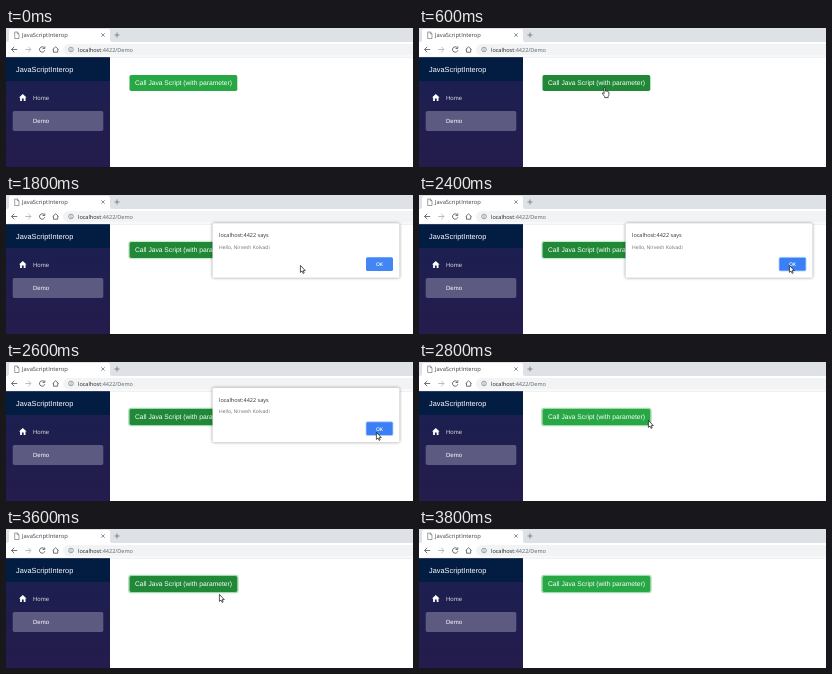
These frames come from a looping animation (407 by 139 pixels, 5800 ms). An HTML page:

```html
<!DOCTYPE html>
<html lang="en">
<head>
<meta charset="utf-8">
<title>JavaScriptInterop</title>
<style>
  html, body { margin: 0; width: 100%; height: 100%; overflow: hidden; background: #fff; }
  svg { display: block; width: 100%; height: 100%; }
  text { font-family: "Liberation Sans", Arial, sans-serif; text-rendering: geometricPrecision; }
  .ui { font-family: "Open Sans", sans-serif; }
  .line { fill: none; stroke: #5f6368; stroke-width: .9; }
  #box { filter: drop-shadow(0 .8px 1.8px rgba(0, 0, 0, .45)); }
  #cursor path { fill: #fff; stroke: #111; stroke-width: .7; stroke-linejoin: round; }
</style>
</head>
<body>
<svg viewBox="0 0 407 139">
  <defs>
    <linearGradient id="side" x2="0" y2="1">
      <stop stop-color="#1a2052"/>
      <stop offset="1" stop-color="#241c4c"/>
    </linearGradient>
  </defs>

  <!-- browser frame -->
  <rect width="407" height="14" fill="#dee1e6"/>
  <path d="M1 14Q3 14 3 12V3Q3 1 5 1H102Q104 1 104 3V12Q104 14 106 14Z" fill="#fff"/>
  <path d="M8.7 4H11.3L13 5.7V10.5H8.7ZM11.3 4V5.7H13" class="line" style="stroke-width:.6"/>
  <text class="ui" x="16" y="9" font-size="5.78" fill="#3c4043">JavaScriptInterop</text>
  <path d="M95.3 5.3L98.7 8.7M98.7 5.3L95.3 8.7M108.5 7H113.5M111 4.5V9.5" class="line" style="stroke-width:.7"/>
  <rect x="57" y="16" width="360" height="11.5" rx="5.75" fill="#f1f3f4"/>
  <path d="M11.2 21.5H5.5M8.2 18.8L5.5 21.5L8.2 24.2" class="line"/>
  <path d="M19.3 21.5H25M22.3 18.8L25 21.5L22.3 24.2" class="line" style="stroke:#b4b7ba"/>
  <path d="M38.2 19.7A2.7 2.7 0 1 0 38.8 22.2M38.8 18.4V20.5H36.6" class="line"/>
  <path d="M46.6 21.6L49.6 18.8L52.6 21.6M47.5 21.2V24.2H51.7V21.2" class="line"/>
  <circle cx="65" cy="21.5" r="2.3" class="line" style="stroke-width:.6"/>
  <path d="M65 21.2V22.8M65 20V20.6" class="line" style="stroke-width:.6"/>
  <text class="ui" x="72" y="23.6" font-size="5.54" fill="#5f6368"><tspan fill="#202124">localhost</tspan>:4422/Demo</text>
  <rect y="28.8" width="407" height=".6" fill="#dadce0"/>

  <!-- sidebar -->
  <rect y="29.4" width="104" height="110" fill="url(#side)"/>
  <rect y="29.4" width="104" height="23.6" fill="#021c42"/>
  <text x="10" y="44" font-size="7.36" fill="#fff">JavaScriptInterop</text>
  <path d="M13 69.6L16.8 66L20.6 69.6H19.5V73H17.7V70.6H15.9V73H14.1V69.6Z" fill="#fff"/>
  <text x="27" y="71.8" font-size="6.02" fill="#d7d7d7">Home</text>
  <rect x="6.7" y="83" width="90.6" height="20" rx="1.7" fill="#5c5a80"/>
  <text x="27" y="95.3" font-size="6.02" fill="#fff">Demo</text>

  <!-- page button -->
  <rect id="ring" x="122.9" y="46.4" width="109" height="17.2" rx="2.3" fill="none" stroke="#a3d9b0" stroke-width="1.3"/>
  <rect id="call" x="123.5" y="47" width="107.8" height="16" rx="1.7"/>
  <text x="129" y="57.4" font-size="6.69" fill="#fff">Call Java Script (with parameter)</text>

  <g id="dialog">
    <rect id="box" x="206.5" y="28.3" width="187" height="54.5" rx="1.5" fill="#fff"/>
    <text class="ui" x="213" y="42" font-size="5.5" fill="#303134">localhost:4422 says</text>
    <text class="ui" x="213" y="53.5" font-size="5" fill="#6a6d71">Hello, Nirvesh Kolvadi</text>
    <rect id="ok" x="360" y="62.3" width="27" height="13.7" rx="1.5" stroke="#b3d0ff"/>
    <text class="ui" x="373.5" y="71" font-size="5" font-weight="600" text-anchor="middle" fill="#fff">OK</text>
  </g>

  <g id="cursor">
    <path id="arrow" d="M.4 .4V7.4L2 6L3.1 8.4L4.2 7.9L3.2 5.6H5.3Z"/>
    <path id="hand" d="M2 6.6V1.2Q2 .4 2.7 .4T3.4 1.2V4.1Q4.4 3.6 4.7 4.4Q5.6 4 5.9 4.8Q6.9 4.6 6.9 5.6V7.6Q6.9 8.6 6.2 9.4V10.6H2.7V9.6L.5 6.8Q.2 6 .9 5.7Q1.5 5.7 2 6.6Z"/>
  </g>
</svg>
<script>
const LOOP = 5800;
const $ = id => document.getElementById(id);
const set = (id, attrs) => {
  for (const name in attrs) $(id).setAttribute(name, attrs[name]);
};

// start time, pointer shape, x, y
const pointer = [
  [0, ""],
  [200, "arrow", 203, 136.5],
  [400, "arrow", 187, 72],
  [600, "hand", 183, 59],
  [800, "hand", 183.5, 56.5],
  [1800, "arrow", 294, 70],
  [2000, "arrow", 345.5, 72.5],
  [2200, "arrow", 373, 74.5],
  [2400, "arrow", 370, 70],
  [2800, "arrow", 229, 58],
  [3000, "hand", 181, 50],
  [3200, "hand", 189, 47.5],
  [3400, "hand", 177, 49.5],
  [3600, "arrow", 213, 65],
  [3800, ""]
];

// start time, opacity, vertical offset
const dialog = [[0, 0, 0], [1000, .17, -6], [1200, 1, 0], [2600, 1, -2.5], [2800, 0, 0]];
const ring = [[0, 0], [1000, .6], [2600, 1]];
const call = [[0, "#28a745"], [600, "#218838"], [2800, "#28a745"], [3000, "#218838"], [3800, "#28a745"]];

const at = (steps, t) => steps.filter(s => s[0] <= t).pop().slice(1);

function draw(now) {
  const t = now % LOOP;
  const [shape, x = 0, y = 0] = at(pointer, t);
  for (const id of ["arrow", "hand"]) set(id, { visibility: id === shape ? "visible" : "hidden" });
  set("cursor", { transform: `translate(${x} ${y})` });

  const [opacity, dy] = at(dialog, t);
  set("dialog", { opacity, transform: `translate(0 ${dy})` });
  const hot = t >= 2400;
  set("ok", { fill: hot ? "#3a7ff5" : "#4285f4", "stroke-width": hot ? .8 : 0 });

  set("ring", { opacity: at(ring, t)[0] });
  set("call", { fill: at(call, t)[0] });
  requestAnimationFrame(draw);
}
draw(performance.now());
</script>
</body>
</html>
```
